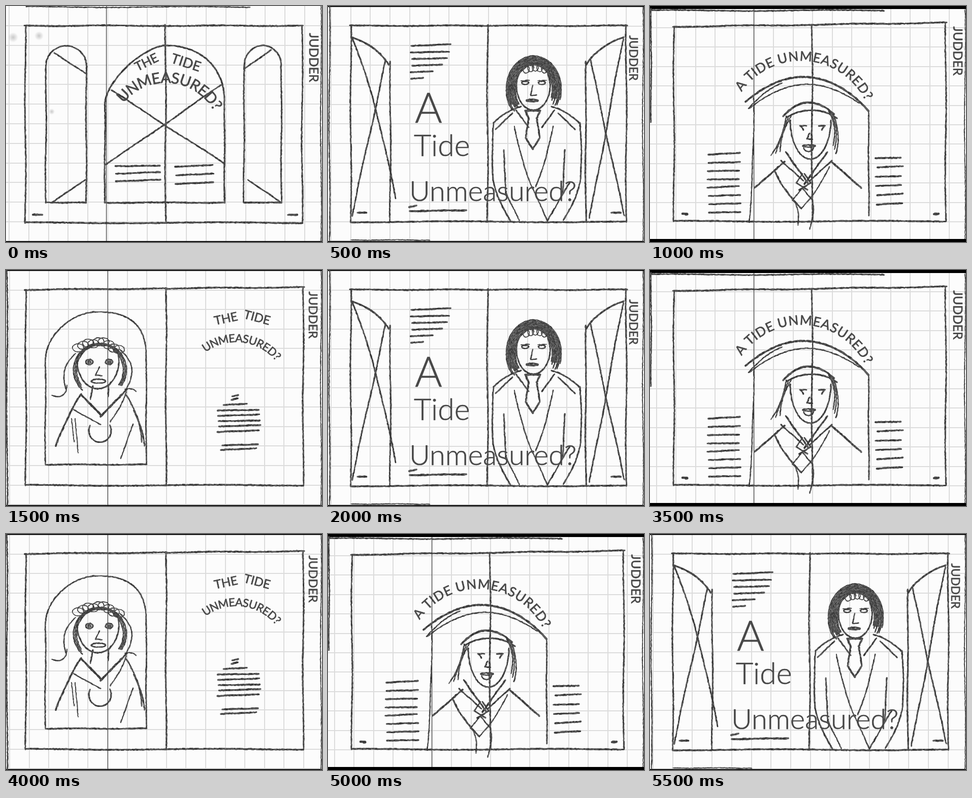
Animation, 622 px wide and 467 px high, one loop 6 s. Source, as an HTML page with a canvas:

```html
<!DOCTYPE html>
<html lang="en">
<head>
<meta charset="utf-8">
<title>Storyboard</title>
<style>
html, body { margin: 0; width: 100%; height: 100%; overflow: hidden; background: #fcfcfc; }
canvas { display: block; width: 622px; height: 467px; }
</style>
</head>
<body>
<canvas id="stage" width="622" height="467"></canvas>
<script>
const W = 622, H = 467, STEP = 500, PI = Math.PI;
const ORDER = 'ACBDCADBDABC';
const FONT = 'Lato, "Open Sans", sans-serif';
let g, seed;

function rnd() {
  seed = (seed * 16807) % 2147483647;
  return seed / 2147483647;
}
const jitter = size => (rnd() - 0.5) * size;

// Grainy pencil stroke along at(t) = [x, y], t from 0 to 1
function trace(w, len, at) {
  const n = Math.max(4, Math.ceil(len / 3));
  let [x0, y0] = at(0);
  for (let i = 1; i <= n; i++) {
    let [x, y] = at(i / n);
    x += jitter(0.8);
    y += jitter(0.8);
    const v = Math.round(52 + rnd() * 46);
    g.strokeStyle = `rgb(${v},${v},${v})`;
    g.lineWidth = w * (0.75 + rnd() * 0.4);
    g.beginPath();
    g.moveTo(x0, y0);
    g.lineTo(x, y);
    g.stroke();
    [x0, y0] = [x, y];
  }
}

// Stroke whose middle is pushed sideways by sag: up if drawn rightwards, right if drawn downwards
function bend(w, x1, y1, x2, y2, sag = 0) {
  const dx = x2 - x1, dy = y2 - y1, len = Math.hypot(dx, dy);
  const sway = Math.min(1, len / 400), phase = rnd() * 6;
  trace(w, len, t => {
    const s = (4 * sag * t * (1 - t) + sway * Math.sin(phase + t * 9)) / len;
    return [x1 + dx * t + dy * s, y1 + dy * t - dx * s];
  });
}

// The same bend on both sides of an axis, x given as offsets for the left side
function both(w, axis, x1, y1, x2, y2, sag = 0) {
  bend(w, axis + x1, y1, axis + x2, y2, sag);
  bend(w, axis - x1, y1, axis - x2, y2, -sag);
}

function oval(w, x, y, rx, ry, from = 0, to = 2 * PI) {
  trace(w, (to - from) * Math.max(rx, ry), t => {
    const a = from + (to - from) * t;
    return [x + rx * Math.cos(a), y + ry * Math.sin(a)];
  });
}

// Arched window; pl and pr set how square each shoulder is
function arch(w, l, r, spring, top, foot, pl = 2, pr = pl) {
  const half = (r - l) / 2;
  trace(w, half * 3, t => {
    const c = Math.cos(t * PI), s = Math.sin(t * PI), e = 2 / (c > 0 ? pl : pr);
    return [l + half - half * Math.sign(c) * Math.abs(c) ** e, spring - (spring - top) * Math.abs(s) ** e];
  });
  bend(w, l, spring, l - 1, foot);
  bend(w, r, spring, r, foot);
  bend(w + 0.5, l, foot, r, foot);
}

function frame(l, t, r, b, mid, tilt = 0) {
  bend(3.5, l - 2, t, mid, t + tilt / 2);
  bend(3.5, mid, t + tilt / 2, r + 2, t + tilt);
  bend(3, l, t, l, b);
  bend(3, r, t + tilt, r, b);
  bend(3.5, l, b, r, b);
  bend(3, mid, t - 2, mid, b);
}

// Rows standing for copy, getting shorter by taper
function rows(x, y, w, n, gap, taper = 0) {
  for (let i = 0; i < n; i++) {
    const k = n > 1 ? i / (n - 1) : 0, yy = y + i * gap, x1 = x + jitter(5);
    bend(3.6, x1, yy + 1, x1 + w * (1 - taper * k * k), yy - 1 + jitter(3));
  }
}

function dashes(axis, half, y) {
  both(4, axis, -half - 9, y, -half + 9, y);
}

function type(text, size, x, y, deg = 0, align = 'center', weight = 400) {
  g.save();
  g.translate(x, y);
  g.rotate(deg * PI / 180);
  g.font = `${weight} ${size}px ${FONT}`;
  g.textAlign = align;
  g.textBaseline = align === 'center' ? 'middle' : 'alphabetic';
  g.fillStyle = g.strokeStyle = '#484848';
  g.lineWidth = 0.7;
  g.fillText(text, 0, 0);
  g.strokeText(text, 0, 0);
  g.restore();
}

// Letters around a circle, centred on tilt and spanning spread degrees
function arcType(text, size, cx, cy, r, tilt, spread) {
  g.font = `${size}px ${FONT}`;
  const total = g.measureText(text).width;
  let run = 0;
  for (const ch of text) {
    const w = g.measureText(ch).width;
    const deg = tilt + spread * ((run + w / 2) / total - 0.5), a = deg * PI / 180;
    type(ch, size, cx + r * Math.sin(a), cy - r * Math.cos(a), deg);
    run += w;
  }
}

function box(color, x, y, w, h) {
  g.fillStyle = color;
  g.fillRect(x, y, w, h);
}

function smudge(x, y, r) {
  const s = g.createRadialGradient(x, y, 0, x, y, r);
  s.addColorStop(0, 'rgba(150,150,150,.5)');
  s.addColorStop(1, 'rgba(150,150,150,0)');
  g.fillStyle = s;
  g.fillRect(x - r, y - r, 2 * r, 2 * r);
}

// Squared paper with dark scan edges and an optional fold
function paper(gx, gy, gap, fold) {
  box('#fcfcfc', 0, 0, W, H);
  for (let x = gx; x < W; x += gap) box('#dcdcdc', Math.round(x) - 1, 0, 2, H);
  for (let y = gy; y < H; y += gap) box('#dcdcdc', 0, Math.round(y) - 1, W, 2);
  if (fold) box('#222', fold, 0, 1, H);
  box('#111', 0, 465, W, 2);
  bend(2, 620, 0, 620, H);
}

const scenes = {
  A() {
    paper(6, 39, 38.8, 197);
    smudge(14, 62, 10);
    smudge(65, 59, 9);
    smudge(90, 209, 6);
    bend(2.5, 40, 2, 480, 2);
    frame(38, 39, 583, 429, 314);
    arch(3.2, 195, 430, 190, 78, 389, 1.5, 2.2);
    arch(3, 79, 158, 117, 79, 389);
    arch(3, 469, 542, 118, 78, 389);
    bend(3, 208, 167, 430, 312);
    bend(3, 197, 314, 424, 156);
    bend(3, 95, 93, 158, 134);
    bend(3, 468, 125, 522, 87);
    both(3, 316, -226, 389, -160, 344);
    rows(215, 316, 87, 3, 15);
    rows(333, 317, 74, 3, 17);
    dashes(313, 251, 413);
    type('THE', 25, 277, 112, -26);
    type('TIDE', 27, 354, 113, 18);
    arcType('UNMEASURED?', 30, 315, 259, 116, 5, 113);
    type('JUDDER', 25, 605, 102, 90);
  },

  B() {
    paper(13, 43, 38.4, 204);
    box('#000', 0, 0, W, 6);
    box('#000', 0, 461, W, 6);
    bend(3, 0, 9, 460, 9);
    bend(3, 2, 5, 2, 230);
    frame(47, 41, 582, 426, 319, -8);
    // arch
    bend(4, 188, 189, 430, 208, 58);
    bend(2.5, 196, 203, 412, 192, 42);
    bend(2.5, 194, 203, 260, 152, 5);
    bend(3, 430, 208, 431, 415);
    bend(2.5, 204, 180, 195, 428, 3);
    // head
    bend(4, 262, 218, 362, 214, 25);
    bend(3.5, 270, 220, 368, 222, 15);
    for (let i = 0; i < 3; i++) {
      bend(2.5, 268 + i * 5, 218, 238 + i * 9, 296 - i * 4, 5 - i * 5);
      bend(2.5, 352 + i * 4, 208 + i * 3, 360 + i * 3, 276 + i * 8, 7);
    }
    oval(3, 316, 226, 40, 77, 0, PI);
    both(3, 320, -25, 237, -12, 237);
    both(3, 320, -23, 238, -18, 245);
    bend(3, 314, 252, 309, 263);
    bend(3, 309, 263, 319, 264);
    oval(3, 313, 277, 12, 2);
    oval(3, 312, 279, 10, 9, 0.2, PI - 0.2);
    // clothes
    both(3.5, 308, -41, 289, 4, 352);
    both(3, 308, -50, 306, -6, 346);
    both(3.5, 311, -46, 308, -105, 360);
    bend(3.5, 246, 328, 298, 401, -4);
    bend(2.5, 353, 318, 298, 401, 4);
    both(3, 302, -2, 332, -14, 350);
    both(3, 302, -14, 350, 8, 364);
    both(2.5, 300, 0, 360, -20, 385);
    bend(2.5, 284, 385, 291, 434, 4);
    bend(2.5, 322, 395, 314, 441, 2);
    rows(115, 293, 62, 8, 16.4);
    rows(446, 300, 50, 6, 18.4);
    both(5, 316, -252, 411, -243, 412);
    arcType('A TIDE UNMEASURED?', 26, 297, 249.5, 149, 4, 120);
    type('JUDDER', 25, 605, 89, 90);
  },

  C() {
    paper(6, 1, 38.7);
    box('#111', 0, 0, W, 2);
    bend(2.5, 3, 0, 3, 465);
    bend(2, 45, 463, 200, 463);
    frame(45, 39, 587, 427, 314);
    // shutters
    both(3.5, 314, -268, 62, -194, 116, 8);
    both(3, 315, -193, 110, -193, 425, 1);
    both(3, 315, -201, 106, -268, 415);
    bend(3, 49, 65, 132, 381, 8);
    bend(3, 581, 65, 515, 420);
    dashes(317, 250, 409);
    rows(164, 78, 78, 6, 13, 0.7);
    // head
    for (let d = 0; d < 18; d += 2.5) oval(2.6, 405, 165, 54 - d, 66 - d, 2.5 + jitter(0.3), 6.7 + jitter(0.3));
    for (let i = 0; i < 5; i++) oval(1.8, 390 + i * 9, 121 + (i - 2) ** 2, 6, 8);
    oval(3, 404, 158, 33, 48, -0.5, PI + 0.5);
    for (const x of [388, 421]) {
      oval(2.5, x, 152, 7, 3);
      bend(2, x - 8, 148, x + 9, 147);
    }
    bend(2.5, 403, 157, 399, 176);
    bend(2.5, 399, 177, 410, 176);
    oval(3.5, 402, 187, 11, 2);
    // jacket
    both(3, 410, -30, 199, -84, 231, -4);
    both(3, 411, -85, 231, -86, 345, -2);
    both(3, 411, -86, 345, -52, 424, -4);
    both(3, 406, -60, 285, -56, 370);
    both(3, 408, -38, 206, -13, 240);
    both(3, 408, -45, 212, -78, 244);
    both(2.5, 405, -38, 238, -4, 358, -3);
    bend(2.5, 402, 358, 432, 425);
    bend(3, 432, 425, 475, 350);
    bend(2.5, 350, 370, 377, 425);
    // tie
    bend(4, 388, 207, 416, 207);
    both(3.5, 403, -15, 207, -8, 222);
    both(3.5, 403, -8, 222, -14, 261);
    both(3.5, 403, -14, 261, 0, 283);
    // title
    type('A', 82, 171, 231, 0, 'left', 300);
    type('Tide', 59, 169, 297, 0, 'left', 300);
    type('Unmeasured?', 56, 160, 386, 0, 'left', 300);
    bend(4, 160, 398, 174, 395);
    bend(4, 161, 406, 272, 404);
    type('JUDDER', 23, 600, 103, 90);
  },

  D() {
    paper(7, 1, 38.6, 200);
    box('#111', 0, 0, W, 2);
    bend(3, 2, 0, 2, 465);
    frame(39, 39, 585, 426, 315, -5);
    arch(2.8, 78, 276, 175, 83, 385, 1.8, 2.6);
    // head
    for (let i = 0; i < 9; i++) oval(1.8, 142 + i * 10, 156 - 12 * Math.sin(i / 8 * PI) + jitter(8), 11, 8);
    for (let d = 0; d < 9; d += 3) oval(2.6, 185, 198, 46 + d, 50 + d / 2, 2.5 - d / 30, 6.9);
    bend(2.5, 137, 165, 118, 235, -12);
    bend(2.5, 120, 228, 90, 248, 12);
    bend(2.5, 225, 158, 236, 236, 17);
    bend(2.5, 234, 236, 256, 240, 3);
    oval(3, 181, 180, 41, 55, -0.2, 3.3);
    for (const x of [164, 203]) {
      oval(3, x, 182, 7, 5);
      oval(3, x, 182, 3, 2);
    }
    bend(2.5, 184, 192, 176, 208);
    bend(2.5, 176, 208, 189, 209);
    oval(3, 182, 220, 14, 4);
    bend(3, 171, 230, 166, 256);
    bend(3, 202, 228, 201, 250);
    // clothes
    bend(3.5, 148, 245, 98, 348, -3);
    bend(4, 148, 247, 187, 287);
    bend(4, 186, 290, 238, 236);
    bend(2.5, 132, 276, 186, 306);
    bend(2.5, 237, 241, 205, 300, 3);
    oval(3, 185, 318, 22, 23, -0.5, 3.6);
    for (let i = 0; i < 2; i++) {
      bend(3, 235 + i * 16, 245 + i * 33, 273 - i * 6, 348 - i * 8, 6 - i * 2);
      bend(2, 129 + i * 7, 294, 134 + i * 8, 340 + i * 22);
    }
    bend(2.5, 250, 305, 226, 373);
    // copy
    rows(446, 249, 12, 2, 7);
    rows(430, 266, 46, 1, 0);
    rows(417, 277, 81, 5, 10.6);
    rows(424, 346, 70, 2, 9);
    type('THE', 24, 433, 97, -12);
    type('TIDE', 24, 494, 95, 15);
    arcType('UNMEASURED?', 22, 453, 243, 107, 7, 88);
    type('JUDDER', 24, 603, 89, 90);
  }
};

const pages = {};
Object.keys(scenes).forEach((key, i) => {
  const c = document.createElement('canvas');
  c.width = W;
  c.height = H;
  g = c.getContext('2d');
  g.lineCap = g.lineJoin = 'round';
  seed = 4211 + i * 977;
  scenes[key]();
  pages[key] = c;
});

const view = document.getElementById('stage').getContext('2d');
function tick() {
  const i = Math.floor(performance.now() / STEP) % ORDER.length;
  view.drawImage(pages[ORDER[i]], 0, 0);
  requestAnimationFrame(tick);
}
tick();
</script>
</body>
</html>
```
